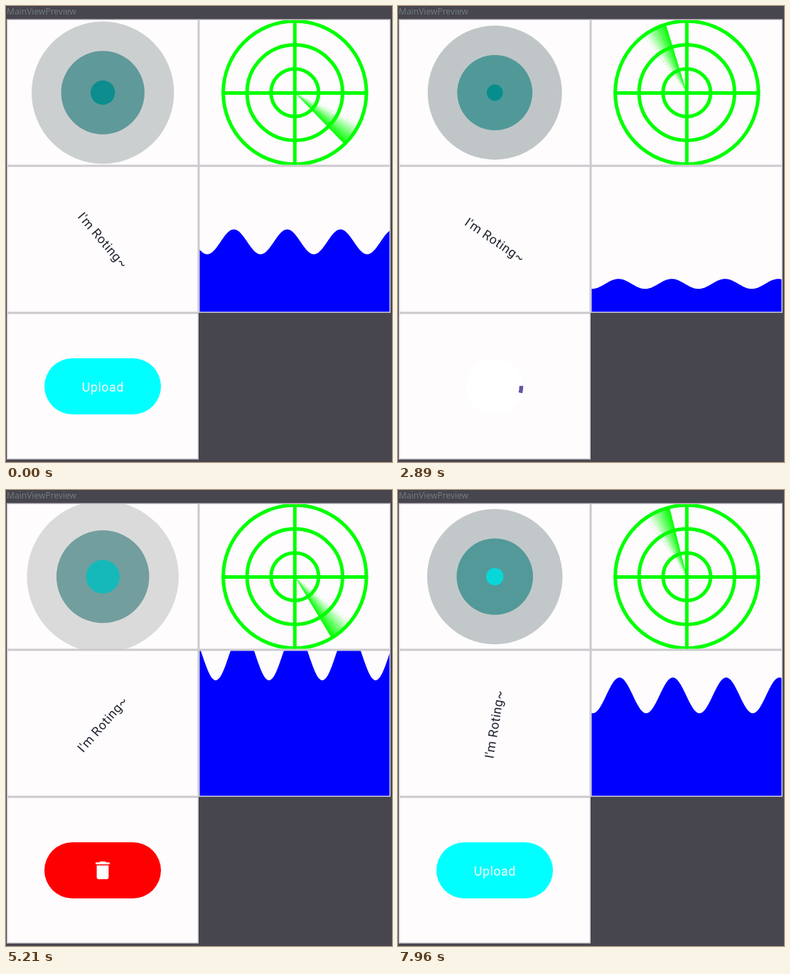
Recreate the animation shown at these times as an HTML page with a canvas. Size 543x642 px, loop 8 s.

```html
<!DOCTYPE html>
<html lang="en">
<head>
<meta charset="utf-8">
<title>MainViewPreview</title>
<style>
  html, body { margin: 0; width: 100%; height: 100%; overflow: hidden; background: #47454e; }
  canvas { display: block; }
</style>
</head>
<body>
<canvas id="stage" width="543" height="642"></canvas>
<script>
const ctx = document.getElementById('stage').getContext('2d');
const LOOP = 8000, TAU = Math.PI * 2, DEG = Math.PI / 180;
const SURFACE = '#fefcfd';
const BODY_FONT = '17.8px Roboto, sans-serif';
const TRASH = new Path2D('M6 19c0 1.1.9 2 2 2h8c1.1 0 2-.9 2-2V7H6v12zM19 4h-3.5l-1-1h-5l-1 1H5v2h14V4z');

const clamp = (v) => Math.min(1, Math.max(0, v));
const mix = (a, b, p) => a + (b - a) * p;
const frac = (v) => v - Math.floor(v);

// cubic-bezier(.4, 0, .2, 1), solved by bisection
function ease(x) {
  x = clamp(x);
  let lo = 0, hi = 1, s = 0.5;
  for (let i = 0; i < 18; i++, s = (lo + hi) / 2) {
    const bx = 1.2 * s * (1 - s) ** 2 + 0.6 * s * s * (1 - s) + s ** 3;
    if (bx < x) lo = s; else hi = s;
  }
  return s * s * (3 - 2 * s);
}

// Shared one-beat clock of the ripples and the wave
const beat = (t) => t / 1010 + 0.413;

function cell(x, y, w, h, draw, t) {
  ctx.save();
  ctx.fillStyle = '#cccacd';
  ctx.fillRect(x, y, w, h);
  ctx.beginPath();
  ctx.rect(x + 1.5, y + 1.5, w - 3, h - 3);
  ctx.fillStyle = SURFACE;
  ctx.fill();
  ctx.clip();
  draw(t);
  ctx.restore();
}

function circle(x, y, r) {
  ctx.beginPath();
  ctx.arc(x, y, r, 0, TAU);
}

function label(text, x, y, color) {
  ctx.font = BODY_FONT;
  ctx.letterSpacing = '0.55px';
  ctx.textAlign = 'center';
  ctx.fillStyle = color;
  ctx.fillText(text, x, y);
  ctx.letterSpacing = '0px';
}

function rippleColor(life, kind) {
  const linear = (1 - life) ** 3;
  const g = 255 * (linear < 0.0031 ? 12.92 * linear : 1.055 * linear ** (1 / 2.4) - 0.055);
  if (kind === 0) return [0, Math.min(g, 140), Math.min(g, 140)];
  if (kind === 1) {
    const p = clamp((life - 0.08) / 0.1);
    return [mix(70, 0, p), mix(118, g, p), mix(174, g, p)];
  }
  return [0, g, g];
}

function ripples(t) {
  const phase = beat(t);
  for (let k = 2; k >= 0; k--) {
    const life = (frac(phase) + k) / 3;
    const kind = (Math.floor(phase) + 3 - k) % 3;
    ctx.fillStyle = `rgba(${rippleColor(life, kind).map(Math.round)}, ${1 - life})`;
    circle(136.2, 122, life * 124.5);
    ctx.fill();
  }
}

function radar(t) {
  const x = 406.3, y = 122, tail = 20 * DEG;
  const head = (46 + t * 0.0716) * DEG;
  const sweep = ctx.createConicGradient(head - tail, x, y);
  sweep.addColorStop(0, 'rgba(0, 255, 0, 0)');
  sweep.addColorStop(20 / 360, '#0f0');
  ctx.fillStyle = sweep;
  ctx.beginPath();
  ctx.moveTo(x, y);
  ctx.arc(x, y, 100.5, head - tail, head);
  ctx.fill();

  ctx.strokeStyle = '#0f0';
  ctx.lineWidth = 5;
  for (const r of [33.5, 67.2, 100.7]) {
    circle(x, y, r);
    ctx.stroke();
  }
  ctx.beginPath();
  ctx.moveTo(x - 103, y + 0.5);
  ctx.lineTo(x + 103, y + 0.5);
  ctx.moveTo(x, y - 103);
  ctx.lineTo(x, y + 103);
  ctx.stroke();
}

function spinningText(t) {
  ctx.translate(136, 330);
  ctx.rotate((49.5 + t * 0.1193) * DEG);
  label("I'm Roting~", 0, 6, '#20222f');
}

function wave(t) {
  const level = frac((4830 - t) / 10050) * 206;
  const crest = 289.5 + 75 * frac(beat(t));
  ctx.fillStyle = '#00f';
  ctx.beginPath();
  ctx.moveTo(271, 432);
  for (let x = 271; x <= 541; x++) {
    ctx.lineTo(x, 431 - level * (1 + 0.177 * Math.cos((x - crest) / 75 * TAU)));
  }
  ctx.lineTo(541, 432);
  ctx.fill();
}

function spinner(t) {
  const turns = (t - 1725) / 1355 + 3;
  const cycle = Math.floor(turns), u = turns - cycle;
  const tail = 290 * ease(u * 2 - 1), head = 290 * ease(u * 2);
  const base = -90 + 216 * cycle + 286 * u;
  ctx.strokeStyle = '#6650a4';
  ctx.lineWidth = 5.5;
  ctx.beginPath();
  ctx.arc(0, 0, 37.4, (base + tail) * DEG, (base + head) * DEG);
  ctx.stroke();
}

function trash() {
  ctx.scale(1.4, 1.4);
  ctx.translate(-12, -12);
  ctx.fillStyle = '#fff';
  ctx.fill(TRASH);
}

const UPLOAD = { width: 164, color: '#0ff', content: () => label('Upload', 0.3, 7.5, '#fff') };
const LOADING = { width: 80, color: '#fff', content: spinner };
const REMOVE = { width: 164, color: '#f00', content: trash };
const SWITCHES = [
  { at: 1480, from: UPLOAD, to: LOADING },
  { at: 4510, from: LOADING, to: REMOVE },
  { at: 7540, from: REMOVE, to: UPLOAD },
];

function pill(state, width, scale, alpha) {
  const w = width * scale, h = 79 * scale;
  ctx.globalAlpha = alpha;
  ctx.fillStyle = state.color;
  ctx.beginPath();
  ctx.roundRect(-w / 2, -h / 2, w, h, h / 2);
  ctx.fill();
}

function content(state, t, alpha) {
  ctx.save();
  ctx.globalAlpha = alpha;
  state.content(t);
  ctx.restore();
}

function button(t) {
  const change = SWITCHES.findLast((s) => t >= s.at) || { at: -LOOP, from: REMOVE, to: UPLOAD };
  const { from, to } = change;
  const p = ease((t - change.at) / 300);
  const width = mix(from.width, to.width, p);
  ctx.translate(136, 535.5);
  if (p < 0.999) {
    pill(from, width, 1, 1 - p);
    content(from, t, 1 - p);
    pill(to, width, 1, p * 0.2);
    pill(to, width, 0.88 + 0.12 * p, p * 0.85);
    content(to, t, p);
  } else {
    pill(to, to.width, 1, 1);
    content(to, t, 1);
  }
}

function render(now) {
  const t = now % LOOP;
  ctx.fillStyle = '#47454e';
  ctx.fillRect(0, 0, 543, 642);
  ctx.font = '12px "Noto Sans", sans-serif';
  ctx.textAlign = 'left';
  ctx.fillStyle = '#707c7b';
  ctx.fillText('MainViewPreview', 1, 12);

  cell(1, 18.5, 270, 206.5, ripples, t);
  cell(271, 18.5, 270, 206.5, radar, t);
  cell(1, 225, 270, 207, spinningText, t);
  cell(271, 225, 270, 207, wave, t);
  cell(1, 432, 270, 206.5, button, t);
  requestAnimationFrame(render);
}
render(performance.now());
</script>
</body>
</html>
```
